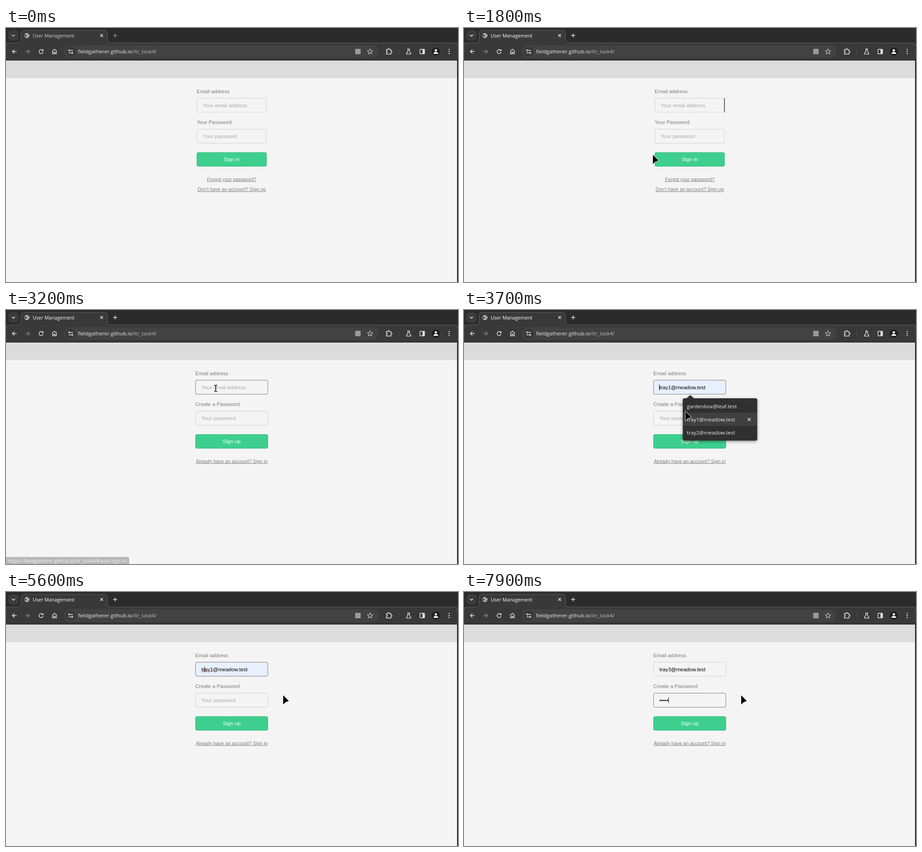
An HTML page for the animation above (8 s loop, 998x561 px).

```html
<!DOCTYPE html>
<html lang="en">
<head>
<meta charset="utf-8">
<title>User Management</title>
<style>
html, body { margin: 0; width: 100%; height: 100%; overflow: hidden; background: #f4f4f4; }
svg { display: block; }
text { font: 11.5px "Liberation Sans", Arial, sans-serif; white-space: pre; }
.ui { font-family: "Open Sans", "Noto Sans", sans-serif; }
.label { fill: #7b7b7b; }
.hint { fill: #a9a9a9; }
.link { font-size: 10.66px; fill: #808080; text-anchor: middle; text-decoration: underline; }
.link.over { fill: #a8a8a8; text-decoration: none; }
.line { fill: none; stroke: #e6e6e6; stroke-width: 1.4; }
.field { fill: #f4f4f4; stroke: #d0d0d0; }
.field.on { stroke: #7c7c7c; }
.field.auto { fill: #e8f0fe; }
.pointer { fill: #000; stroke: #fff; stroke-width: 1.6; paint-order: stroke; stroke-linejoin: round; }
</style>
</head>
<body>
<svg width="998" height="561" viewBox="0 0 998 561">
  <rect width="998" height="561" fill="#f4f4f4"/>
  <rect y="71" width="998" height="40" fill="#dcdcdc"/>

  <!-- browser window -->
  <rect width="998" height="34" fill="#2b2b2b"/>
  <rect y="33" width="998" height="38" fill="#393939"/>
  <path d="M0 71V40Q0 33 8 33H25Q33 33 33 25V13Q33 5 41 5H216Q224 5 224 13V25Q224 33 232 33H990Q997 33 997 40V71Z" fill="#393939"/>
  <path d="M0 40Q0 33 8 33H25Q33 33 33 25V13Q33 5 41 5H216Q224 5 224 13V25Q224 33 232 33H990Q997 33 997 40" fill="none" stroke="#626262"/>
  <rect y="70.5" width="998" height="1.2" fill="#101010"/>
  <rect x="996" y="71" width="2" height="490" fill="#1c1c1c"/>
  <rect x="5" y="5" width="23" height="23" rx="7" fill="#3b3b3b"/>
  <path id="chevron" class="line" d="M13.3 15l3.2 3.2 3.2-3.2"/>
  <circle cx="46.3" cy="16.5" r="5.6" fill="#c2c2c2"/>
  <path d="M42 14q3 0 4 2t-1 4q-3-1-4-4zM47 11.5q3 1 4 3-2 1-3 0zM48.5 17l2.5 1-2 2.6z" fill="#4a4a4a"/>
  <text id="tab" class="ui" x="59" y="20.6" style="font-size:10.66px">User Management</text>
  <path class="line" d="M208.2 13.5l6 6m0-6l-6 6"/>
  <path id="plus" class="line" d="M236.5 16.5h9m-4.500-4.500v9"/>

  <!-- toolbar -->
  <rect x="128" y="38" width="695" height="28" rx="14" fill="#424242"/>
  <circle cx="143" cy="52" r="10.500" fill="#373737"/>
  <g class="line">
    <path d="M23.500 52H14m4.600-4.600L14 52l4.600 4.600"/>
    <path d="M42.500 52H52m-4.600-4.600L52 52l-4.600 4.600" stroke="#858585"/>
    <path d="M81.600 50A4.500 4.500 0 1 0 81.900 53.200M82 47v3.400h-3.500"/>
    <path d="M102.700 57V50.300L107 47l4.300 3.300V57h-3v-3.600h-2.600V57z"/>
    <path d="M142.500 49.500h5.500m-10 5.500h5"/>
    <circle cx="139.700" cy="49.500" r="1.600"/><circle cx="146" cy="55" r="1.600"/>
    <path d="M803.800 46.300l1.700 3.700 4 .4-3 2.700.9 4-3.600-2.100-3.600 2.100.9-4-3-2.700 4-.4z" stroke="#c4c4c4" stroke-width="1.200"/>
    <path d="M839.800 47.800h3.200q0-2.300 1.900-2.300t1.900 2.300h3.200v3q2.300 0 2.300 1.700t-2.300 1.700v3.300h-10.200v-3.200q2.200 0 2.200-1.700t-2.200-1.700z"/>
    <path d="M867 46v12" stroke="#565656" stroke-width="1"/>
    <path d="M886 46.500h6m-4.500 0v4l-3.500 6.300q0 .8.800.8h8.400q.8 0 .8-.8l-3.500-6.300v-4"/>
    <rect x="914" y="47" width="10.200" height="10" rx="1"/>
    <path d="M921.700 47v10" stroke-width="4"/>
  </g>
  <rect x="771" y="46" width="12" height="12" fill="#9a9a9a"/>
  <circle cx="949" cy="52" r="9" fill="#1e1e1e"/>
  <circle cx="949" cy="49.300" r="2.600" fill="#fff"/>
  <path d="M943.800 57q0-4 5.200-4t5.200 4z" fill="#fff"/>
  <g fill="#e6e6e6"><circle cx="978.500" cy="47.500" r="1.300"/><circle cx="978.500" cy="52" r="1.300"/><circle cx="978.500" cy="56.500" r="1.300"/></g>
  <text class="ui" x="159" y="56" fill="#ededed" style="font-size:11.53px">fieldgatherer.github.io<tspan fill="#bdbdbd">/itr_task4/</tspan></text>

  <!-- form -->
  <text id="mailLabel" class="label" y="143.500">Email address</text>
  <rect id="mail" class="field" y="155" height="31" rx="3"/>
  <text id="mailText" y="174.500"></text>
  <path id="wave" fill="none" stroke="#e05048" stroke-width=".9"/>
  <text id="passLabel" class="label" y="212"></text>
  <rect id="pass" class="field" y="223.500" height="31" rx="3"/>
  <text id="passText" y="243"></text>
  <rect id="button" y="275" height="30.500" rx="3" fill="#3ecf8e" stroke="#34b87c"/>
  <text id="buttonText" x="498.300" y="294" fill="#fff" text-anchor="middle"></text>
  <text id="link1" class="link" x="498.300" y="337.500"></text>
  <text id="link2" class="link" x="498.300" y="360">Don't have an account? Sign up</text>
  <path id="edge" d="M575 155v31" stroke="#222" stroke-width="1.300"/>
  <rect id="caret" width="1" height="13" fill="#111"/>

  <!-- suggestions -->
  <g id="popup">
    <path d="M487 195h4.500l8-7 8 7H643.500q4 0 4 4v85.500q0 4-4 4H487q-4 0-4-4V199q0-4 4-4z" fill="#303030" style="filter:drop-shadow(0 2px 3px #0006)"/>
    <g id="row"><rect x="483" y="227" width="164.500" height="29" fill="#fff" opacity=".08"/>
    <path class="line" d="M626.500 238.500l6.500 6.500m0-6.500l-6.500 6.500"/></g>
    <g class="ui" fill="#ececec" style="font-size:11.4px">
      <text class="ui" x="492" y="216.500">gardenbox@leaf.test</text>
      <text class="ui" x="492" y="246">tray1@meadow.test</text>
      <text class="ui" x="492" y="275">tray2@meadow.test</text>
    </g>
  </g>

  <g id="status">
    <path id="statusBox" fill="#2d2d2d"/>
    <text id="statusText" class="ui" x="4" y="558" fill="#f0f0f0" style="font-size:10.62px"></text>
  </g>

  <path id="arrow" class="pointer" d="M0 0V20.500L4.800 15.800L12.500 12.800Z"/>
  <path id="beam" class="pointer" d="M-3.500-7.500H-1L0-6.700 1-7.500H3.500V-6H.8V6H3.500V7.500H1L0 6.700-1 7.500H-3.500V6H-.8V-6H-3.500Z"/>
  <path id="hand" class="pointer" d="M-2 1.500Q-2 0 -.5 0T1 1.500V6L6 7Q8 7.500 8 9.500L7 14V17H-2V15L-6 10Q-6.500 8-4.500 8.500L-2 10Z"/>
</svg>
<script>
const LOOP = 8000, STEP = 100;
const $ = Object.fromEntries([...document.querySelectorAll("[id]")].map(e => [e.id, e]));

// time, x, y
const path = [
  [400, 640, 432], [900, 560, 235], [1200, 545, 172], [1400, 520, 172],
  [1800, 417, 280], [2300, 567, 360], [2700, 567, 360], [2900, 548, 333],
  [3200, 463, 173], [3500, 463, 173], [3700, 489, 224], [4300, 489, 224], [4700, 612, 228]
];
// time, caret index in the address
const carets = [[3400, 0], [4200, 17], [4800, 0], [5200, 1], [5500, 2], [5800, 3], [5900, 4], [6000, 5], [6100, 4], [6300, 5]];
const dots = [[7200, 1], [7300, 2], [7400, 3], [7700, 4], [7900, 5]];
const fades = [[3500, .5], [3600, 1], [4200, .62], [4300, 0]];
const statusFades = [[2200, 1], [3200, .3], [3300, 0]];

const at = (table, t) => table.reduce((v, [time, value]) => t >= time ? value : v, 0);
const within = (t, a, b) => t >= a && t < b;
const set = (el, attrs) => { for (const k in attrs) el.setAttribute(k, attrs[k]); };
const show = (el, on) => set(el, { visibility: on ? "visible" : "hidden" });
const write = (el, s) => { if (el.textContent !== s) el.textContent = s; };

function cursorAt(t) {
  const i = path.findIndex(p => p[0] > t);
  if (i < 0) return path[path.length - 1].slice(1);
  if (i === 0) return [-50, -50];
  const [a, x, y] = path[i - 1], [b, u, v] = path[i];
  let k = (t - a) / (b - a);
  k = k * k * (3 - 2 * k);
  return [x + (u - x) * k, y + (v - y) * k];
}

function hitTest(x, y, left, signUp, popupOpen) {
  if (popupOpen && x >= 483 && x <= 648 && y >= 195 && y <= 289) return "popup";
  if (x < left || x > 996.6 - left) return "";
  if (y >= 155 && y <= 187) return "mail";
  if (y >= 223 && y <= 255) return "pass";
  if (y >= 275 && y <= 306) return "button";
  if (y >= 328 && y <= 341) return "link1";
  return !signUp && y >= 350 && y <= 364 ? "link2" : "";
}

function placeForm(left, signUp) {
  const width = 996.6 - 2 * left;
  for (const el of [$.mail, $.pass, $.button]) set(el, { x: left + .5, width: width - 1 });
  for (const el of [$.mailLabel, $.passLabel]) set(el, { x: left });
  for (const el of [$.mailText, $.passText]) set(el, { x: left + 13.5 });
  write($.passLabel, signUp ? "Create a Password" : "Your Password");
  write($.buttonText, signUp ? "Sign up" : "Sign in");
  write($.link1, signUp ? "Already have an account? Sign in" : "Forgot your password?");
  show($.link2, !signUp);
}

function fill(el, value, hint) {
  write(el, value || hint);
  el.classList.toggle("hint", !value);
}

function wavePath(x, width) {
  let d = `M${x} 175`;
  for (let i = 2; i <= width; i += 2) d += `L${x + i} ${i % 4 ? 177 : 175}`;
  return d;
}

function render(t) {
  const signUp = t >= 2800, left = signUp ? 418 : 421, textX = left + 13.5;
  placeForm(left, signUp);

  const active = t >= 1300;
  set($.tab, { fill: active ? "#fff" : "#cfcfcf" });
  $.plus.style.stroke = active ? "#e6e6e6" : "#8e8e8e";
  $.chevron.style.stroke = active ? "#fff" : "#d0d0d0";
  show($.edge, within(t, 1400, 2100));

  const [x, y] = cursorAt(t);
  const hit = hitTest(x, y, left, signUp, within(t, 3500, 4200));
  const kind = /mail|pass/.test(hit) ? "beam" : /link|button/.test(hit) ? "hand" : "arrow";
  for (const name of ["arrow", "beam", "hand"]) show($[name], name === kind);
  set($[kind], { transform: `translate(${x} ${y})` });
  for (const name of ["link1", "link2"]) $[name].classList.toggle("over", hit === name);

  const mailFocus = within(t, 3400, 6500), passFocus = t >= 6500;
  $.mail.classList.toggle("on", mailFocus || hit === "mail");
  $.pass.classList.toggle("on", passFocus || hit === "pass");
  $.mail.classList.toggle("auto", within(t, 3700, 6100));

  const digit = t < 6100 ? "1" : t < 6300 ? "" : "3";
  fill($.mailText, t >= 3700 ? `tray${digit}@meadow.test` : "", "Your email address");
  const count = at(dots, t);
  fill($.passText, "•".repeat(count), "Your password");

  const field = passFocus ? $.passText : $.mailText;
  const index = passFocus ? count : at(carets, t);
  const offset = index ? field.getSubStringLength(0, index) : 0;
  show($.caret, mailFocus || passFocus);
  set($.caret, { x: textX + offset - .5, y: passFocus ? 232.5 : 164.5 });

  show($.wave, within(t, 4200, 6500));
  set($.wave, { d: wavePath(textX, t >= 4200 ? $.mailText.getSubStringLength(0, 4 + digit.length) : 0) });

  set($.popup, { opacity: at(fades, t) });
  show($.row, t >= 3700);

  const signInUrl = t >= 2800;
  set($.status, { opacity: at(statusFades, t) });
  write($.statusText, "https://fieldgatherer.github.io/itr_task4/#auth-sign-" + (signInUrl ? "in" : "up"));
  set($.statusBox, { d: `M0 545.500H${signInUrl ? 268 : 272}q4 0 4 4V561H0z` });
}

function tick() {
  render(Math.floor(performance.now() % LOOP / STEP) * STEP);
  requestAnimationFrame(tick);
}
tick();
</script>
</body>
</html>
```
